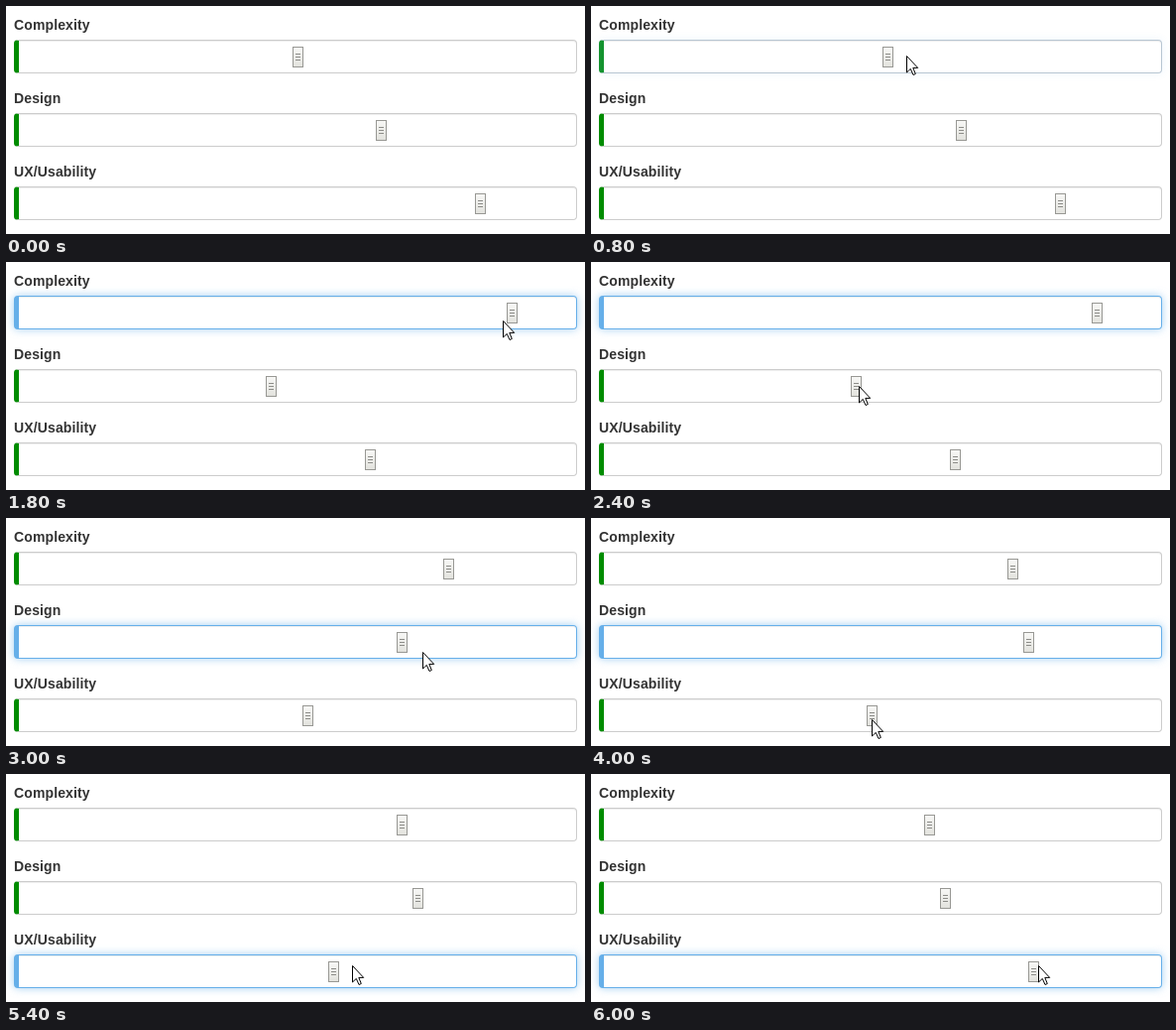
An HTML page for the animation above (6100 ms loop, 584 px wide and 230 px high).

```html
<!DOCTYPE html>
<html lang="en">
<head>
<meta charset="utf-8">
<title>Linked sliders</title>
<style>
  html, body { margin: 0; width: 100%; height: 100%; overflow: hidden; background: #fff; }
  #stage { position: relative; width: 584px; height: 230px; overflow: hidden; background: #fff; }
  .field {
    position: absolute; left: 8px; width: 568px; height: 34px; box-sizing: border-box;
    border: 1px solid #ccc; border-left-width: 5px; border-radius: 4px; background: #fff;
  }
  svg { position: absolute; left: 0; top: 0; }
  text { font: bold 14px "Liberation Sans", Arial, sans-serif; letter-spacing: .13px; fill: #333; }
</style>
</head>
<body>
<div id="stage">
  <div class="field" style="top:34px"></div>
  <div class="field" style="top:108px"></div>
  <div class="field" style="top:182px"></div>
  <svg width="584" height="230" viewBox="0 0 584 230">
    <defs>
      <linearGradient id="face" x1="0" y1="0" x2="0" y2="1">
        <stop offset="0" stop-color="#f8f8f6"/>
        <stop offset="1" stop-color="#e2e2dd"/>
      </linearGradient>
      <g id="thumb">
        <rect x=".5" y=".5" width="10" height="20" fill="url(#face)" stroke="#989894"/>
        <path d="M3 7.5h5M3 10.5h5M3 13.5h5" stroke="#8c8c88"/>
      </g>
    </defs>
    <text x="8" y="24">Complexity</text>
    <text x="8" y="98">Design</text>
    <text x="8" y="172">UX/Usability</text>
    <use class="thumb" href="#thumb"/>
    <use class="thumb" href="#thumb"/>
    <use class="thumb" href="#thumb"/>
    <path id="cursor" d="M.5 .5V17L4.3 13.4L7 19.5L9.3 18.5L6.8 12.4H11.7Z"
          fill="#fff" stroke="#000" stroke-linejoin="round"/>
  </svg>
</div>
<script>
const LOOP = 6100, STEP = 100, FADE = 150;
const LIMIT = 200;              // shared budget of the three sliders
const GRAB = 8, LEAD = 70;      // pointer offset in px, lead over the thumb in ms
const GREEN = [0, 140, 0], GREY = [204, 204, 204], BLUE = [102, 175, 233];
const ENTER = { time: 200, x: 336, y: 46 };

// Steady pulls of one slider; y is the pointer height.
const pulls = [
  { row: 0, start: 770,  end: 1795, from: 50,   to: 91,   y0: 49,  y1: 56 },
  { row: 1, start: 2500, end: 3160, from: 45,   to: 78,   y0: 125, y1: 137 },
  { row: 2, start: 4120, end: 4500, from: 47.5, to: 57,   y0: 203, y1: 203 },
  { row: 2, start: 4500, end: 4925, from: 57,   to: 40,   y0: 203, y1: 192 },
  { row: 2, start: 4925, end: 6000, from: 40,   to: 79.4, y0: 192, y1: 193 }
];

const clamp = v => Math.max(0, Math.min(1, v));
const lerp = (a, b, k) => a + (b - a) * k;
const smooth = k => k * k * (3 - 2 * k);
const thumbX = value => 25.02 + 5.27 * value;
const progress = (p, t) => clamp((t - p.start) / (p.end - p.start));
const valueOf = (p, t) => lerp(p.from, p.to, progress(p, t));
const lastPull = t => pulls.findLastIndex(p => t >= p.start);

// Raising one slider above the limit lowers the other two equally.
function buildStates() {
  const values = [50, 66, 85], states = [];
  for (let t = 0; t < LOOP; t += STEP) {
    const pull = pulls[lastPull(t)];
    if (pull) {
      values[pull.row] = Math.round(valueOf(pull, t));
      const excess = values[0] + values[1] + values[2] - LIMIT;
      const cut = Math.max(0, Math.floor(excess / 2));
      for (let i = 0; i < 3; i++) if (i !== pull.row) values[i] -= cut;
    }
    states.push(values.slice());
  }
  return states;
}

function onPull(p, t) {
  return { x: thumbX(valueOf(p, t)) + GRAB, y: lerp(p.y0, p.y1, progress(p, t)) };
}

// Rides the current pull, then glides to the next one and rests there.
function pointerAt(t) {
  const i = lastPull(t), pull = pulls[i], next = pulls[i + 1];
  if (pull && (t <= pull.end || !next)) return onPull(pull, t);
  const a = pull ? onPull(pull, t) : ENTER, b = onPull(next, t);
  const begin = pull ? pull.end : ENTER.time;
  const k = smooth(clamp((t - begin) / (next.start - begin) / 0.8));
  return { x: lerp(a.x, b.x, k), y: lerp(a.y, b.y, k) };
}

const states = buildStates();
const presses = [0, 1, 2].map(row => pulls.find(p => p.row === row).start);
const fields = document.querySelectorAll(".field");
const thumbs = document.querySelectorAll(".thumb");
const cursor = document.getElementById("cursor");

const fade = (t, start) => clamp((t - start) / FADE);
const mix = (a, b, k) => `rgb(${a.map((v, i) => Math.round(lerp(v, b[i], k)))})`;
const place = (el, x, y) =>
  el.setAttribute("transform", `translate(${Math.round(x)} ${Math.round(y)})`);

function draw(ms) {
  const frame = Math.floor(ms % LOOP / STEP), t = frame * STEP;
  states[frame].forEach((value, i) => {
    const k = fade(t, presses[i]) - fade(t, presses[i + 1] ?? LOOP);
    const style = fields[i].style;
    style.borderColor = mix(GREY, BLUE, k);
    style.borderLeftColor = mix(GREEN, BLUE, k);
    style.boxShadow =
      `inset 0 1px 1px rgba(0,0,0,.075), 0 0 8px rgba(${BLUE},${0.6 * k})`;
    place(thumbs[i], thumbX(value), 41 + 74 * i);
  });
  const tip = pointerAt(t + LEAD);
  cursor.style.display = t < ENTER.time ? "none" : "";
  place(cursor, tip.x, tip.y);
}

const start = performance.now();
function tick() {
  draw(performance.now() - start);
  requestAnimationFrame(tick);
}
tick();
</script>
</body>
</html>
```
